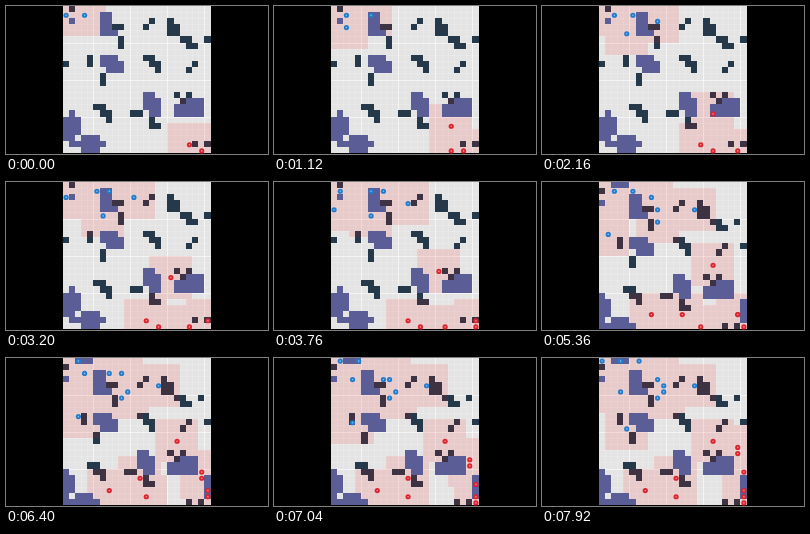
Write an HTML page with a canvas that moves like this. It is 262 by 148 pixels and loops after 8000 ms.

```html
<!DOCTYPE html>
<html lang="en">
<head>
<meta charset="utf-8">
<title>Grid exploration</title>
<style>
html, body { margin: 0; width: 100%; height: 100%; overflow: hidden; background: #000; }
canvas { display: block; width: 262px; height: 148px; }
</style>
</head>
<body>
<canvas id="stage"></canvas>
<script>
const W = 262, H = 148, N = 24, LEFT = 57, CELL = H / N, SIGHT = 3;
const LOOP = 8000, LAST = 7920, LIFE = 5700, TURN = 293, FIRST_TURN = 80, DRIFT_AT = 5040;
const canvas = document.getElementById('stage');
const ctx = canvas.getContext('2d');
const dpr = window.devicePixelRatio || 1;
canvas.width = W * dpr;
canvas.height = H * dpr;

const edge = i => Math.floor(i * CELL);
const lerp = (a, b, u) => a + (b - a) * u;

// Water: rectangles of cells as column, row, width, height
const lakes = [
  [1, 2, 1, 1], [6, 1, 2, 4], [8, 4, 1, 1], [6, 8, 3, 2], [7, 9, 3, 2],
  [13, 14, 2, 2], [13, 15, 3, 2], [14, 17, 2, 1], [19, 15, 4, 1], [18, 16, 5, 2],
  [1, 17, 1, 1], [0, 18, 3, 3], [0, 21, 2, 1], [3, 21, 3, 1], [1, 22, 6, 1], [3, 23, 3, 1]
];

// Walls: walks from a start cell; capitals step without laying a cell
const walks = [
  [1, 0, ''], [14, 2, 'Ld'], [17, 2, 'ddru'], [8, 3, 'rDdd'], [19, 5, 'rdr'], [23, 5, ''],
  [4, 8, 'd'], [0, 9, ''], [13, 8, 'rdrd'], [21, 9, 'Ld'], [6, 11, 'd'], [18, 14, 'DrUr'],
  [5, 16, 'rdrd'], [11, 17, 'r'], [14, 18, 'dr'], [21, 22, 'Rr']
];
const moves = { l: [-1, 0], r: [1, 0], u: [0, -1], d: [0, 1] };

function walkCells([col, row, steps]) {
  const cells = [[col, row]];
  for (const step of steps) {
    const [dx, dy] = moves[step.toLowerCase()];
    col += dx;
    row += dy;
    if (step === step.toLowerCase()) cells.push([col, row]);
  }
  return cells;
}

function lakeCells([col, row, w, h]) {
  return Array.from({ length: w * h }, (_, i) => [col + i % w, row + Math.floor(i / w)]);
}

const water = lakes.flatMap(lakeCells);
const walls = walks.flatMap(walkCells);

// Each route's points are evenly spaced over the agent's walk
const teams = [
  { color: '#1f7ccf', delay: 0, routes: [
    [[3, 1], [10, 2], [15, 4]],
    [[0, 1], [5, 5], [9, 6]],
    [[1, 1], [8, 1], [10, 5]],
    [[0, 1], [8, 1], [9, 3]],
    [[0, 0], [0, 8], [4, 11]],
    [[0, 1], [5, 1], [10, 4]],
    [[0, 0], [3, 2], [3, 5]],
    [[0, 0], [6, 0]],
    [[0, 0], [3, 0]],
    [[0, 0]]] },
  { color: '#dc232e', delay: 80, routes: [
    [[20, 22], [17, 15], [18, 13]],
    [[22, 23], [14, 22], [7, 21]],
    [[22, 23], [14, 23], [12, 19]],
    [[23, 23], [17, 23], [12, 22]],
    [[23, 23], [22, 21], [22, 14]],
    [[23, 23], [22, 21], [22, 15]],
    [[23, 23], [23, 22], [23, 18]],
    [[23, 23], [23, 21]],
    [[23, 23], [23, 22]],
    [[23, 23]]] }
];

// Two agents start at once; the rest arrive at slowly growing intervals
const birthOf = i => 725 * Math.max(0, i - 1) ** 1.12;

function turnTime(t, delay) {
  const since = t - FIRST_TURN - delay;
  return since < 0 ? 0 : (Math.floor(since / TURN) + 1) * TURN;
}

function locate(route, birth, t) {
  const end = Math.min(LAST, birth + LIFE);
  const u = Math.min(1, Math.max(0, (t - birth) / (end - birth)));
  const place = u * (route.length - 1);
  const k = Math.floor(place);
  const from = route[k], to = route[k + 1] || from;
  return from.map((v, axis) => Math.round(lerp(v, to[axis], place - k)));
}

function findAgents(t) {
  return teams.flatMap(({ color, delay, routes }) => routes
    .map((route, i) => ({ color, route, birth: birthOf(i) }))
    .filter(agent => t >= agent.birth)
    .map(({ route, birth }) => ({ color, pos: locate(route, birth, turnTime(t, delay)) })));
}

function addBox(col, row, size) {
  const x0 = edge(Math.max(0, col)), y0 = edge(Math.max(0, row));
  const x1 = edge(Math.min(N, col + size)), y1 = edge(Math.min(N, row + size));
  ctx.rect(LEFT + x0, y0, x1 - x0, y1 - y0);
}

function drawCells(cells, color, drift) {
  ctx.fillStyle = color;
  ctx.beginPath();
  for (const [col, row] of cells) addBox((col - drift + N) % N, (row + drift) % N, 1);
  ctx.fill();
}

function drawGrid() {
  for (let i = 1; i < N; i++) {
    ctx.fillStyle = `rgba(255,255,255,${i % 6 === 5 ? 0.6 : 0.15})`;
    ctx.fillRect(LEFT + edge(i), 0, 1, H);
    ctx.fillStyle = `rgba(255,255,255,${i % 6 === 0 ? 0.6 : 0.15})`;
    ctx.fillRect(LEFT, edge(i), H, 1);
  }
}

function dot(x, y, r, color) {
  ctx.fillStyle = color;
  ctx.beginPath();
  ctx.arc(x, y, r, 0, Math.PI * 2);
  ctx.fill();
}

function draw(t) {
  const agents = findAgents(t);
  const drift = t >= DRIFT_AT ? 1 : 0;

  ctx.setTransform(dpr, 0, 0, dpr, 0, 0);
  ctx.fillStyle = '#000';
  ctx.fillRect(0, 0, W, H);
  ctx.fillStyle = '#e4e4e4';
  ctx.fillRect(LEFT, 0, H, H);
  drawGrid();
  drawCells(walls, '#26394b', drift);

  // One shared fill keeps overlapping views equally tinted
  ctx.fillStyle = 'rgba(255,0,0,.11)';
  ctx.beginPath();
  for (const { pos: [col, row] } of agents) addBox(col - SIGHT, row - SIGHT, SIGHT * 2 + 1);
  ctx.fill();

  drawCells(water, '#5a5d96', drift);
  drawCells(walls.filter(([c, r]) => water.some(([x, y]) => x === c && y === r)), '#3d3145', drift);
  ctx.fillStyle = '#000';
  ctx.fillRect(LEFT, H - 1, H, 1);

  for (const { color, pos: [col, row] } of agents) {
    const x = LEFT + (col + 0.5) * CELL, y = (row + 0.5) * CELL;
    dot(x, y, 2.6, color);
    dot(x, y, 0.8, 'rgba(255,255,255,.5)');
  }
}

const origin = performance.now();
function frame() {
  draw((performance.now() - origin) % LOOP);
  requestAnimationFrame(frame);
}
frame();
</script>
</body>
</html>
```
